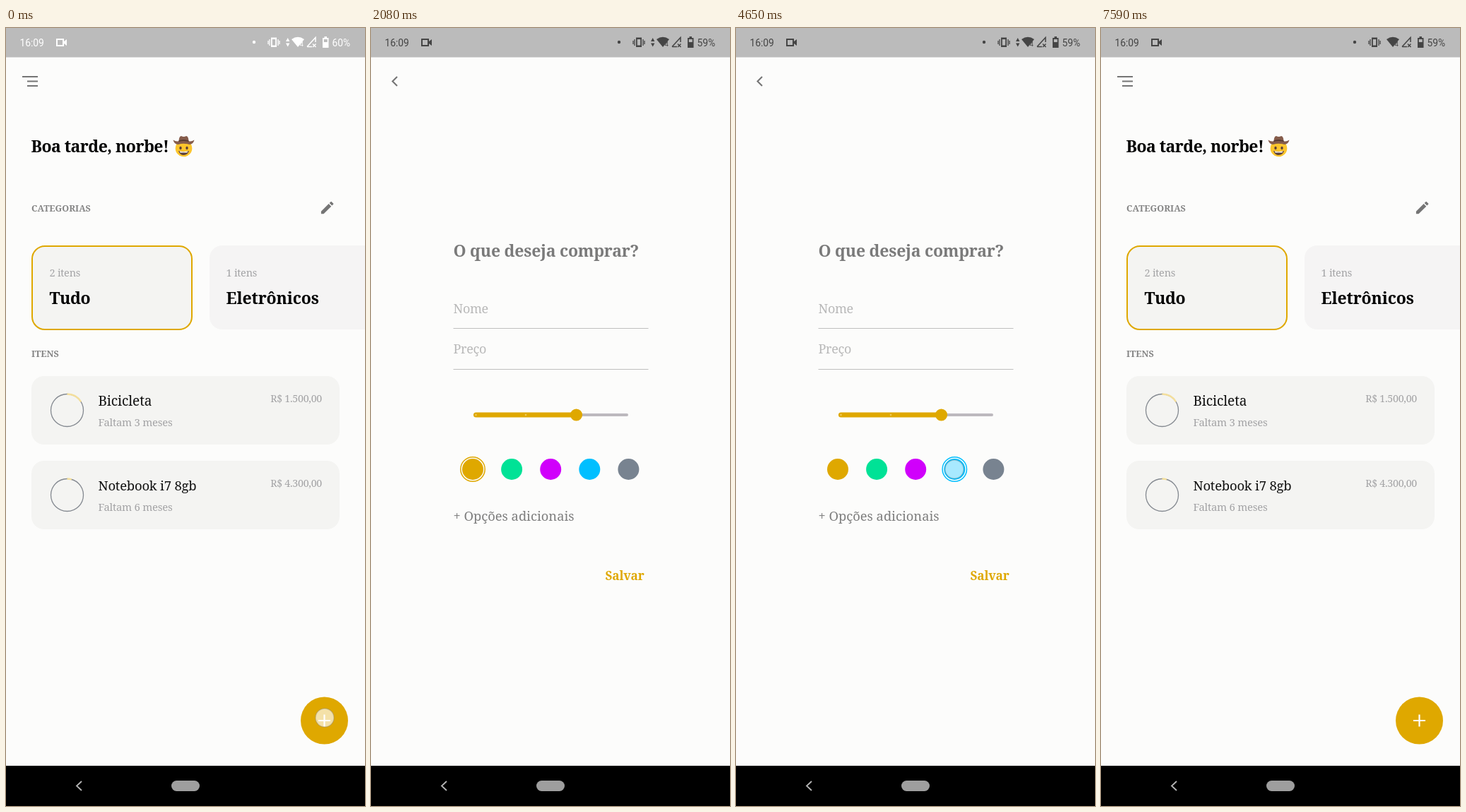
Recreate the animation shown at these times as an HTML page. Size 508 by 1102 pixels, loop 7650 ms.

```html
<!DOCTYPE html>
<html lang="pt-BR">
<head>
<meta charset="utf-8">
<title>Lista de compras</title>
<style>
  html, body { margin: 0; width: 100%; height: 100%; overflow: hidden; background: #000; }
  svg { display: block; width: 100vw; height: 100vh; }
  text { font-family: "Noto Serif", serif; }
  .ui { font-family: Roboto, sans-serif; }
  .big { font-size: 23px; font-weight: 700; }
  .cap { font-size: 12.6px; font-weight: 600; fill: #858585; }
  .light { font-weight: 300; fill: #a3a3a5; letter-spacing: -.25px; }
  .hint { font-size: 18px; fill: #b9b9b9; letter-spacing: -.35px; }
  .line { fill: none; stroke: #757575; stroke-width: 2.1; }
</style>
</head>
<body>
<svg viewBox="0 0 508 1102" preserveAspectRatio="none">
  <defs>
    <clipPath id="screen"><rect width="508" height="1045"/></clipPath>
    <g id="page">
      <rect width="508" height="1045" fill="#fcfcfb"/>
      <rect width="508" height="41.5" fill="#bbb"/>
    </g>
  </defs>
  <rect width="508" height="1102"/>

  <g clip-path="url(#screen)">
    <g id="home">
      <use href="#page"/>
      <path class="line" d="M23 69H45M30 75.5H45M30 82H45"/>
      <text class="big" x="35.500" y="176" letter-spacing="-.52">Boa tarde, norbe!</text>
      <g id="cowboy">
        <circle cx="251.500" cy="170.500" r="11.800" fill="#fcc52c"/>
        <ellipse cx="247" cy="170" rx="1.700" ry="2.300" fill="#5d4037"/>
        <ellipse cx="256" cy="170" rx="1.700" ry="2.300" fill="#5d4037"/>
        <path d="M244 174Q251.500 176 259 174Q257 180 251.500 180T244 174Z" fill="#5d4037"/>
        <path d="M245.500 174.500Q251.500 176 257.500 174.500L256.500 176.500H246.500Z" fill="#fff"/>
        <path d="M236.500 158.500Q241 161.500 244.500 160Q245 153 248 153Q251.500 155 255 153Q258 153 258.500 160Q262 161.500 266.500 158.500Q265 165 259.500 165Q251.500 162.500 243.500 165Q238 165 236.500 158.500Z" fill="#855c4b"/>
        <path d="M244.500 159.500Q251.500 157 258.500 159.500V161Q251.500 159 244.500 161Z" fill="#543930"/>
      </g>
      <text class="cap" x="36" y="260">CATEGORIAS</text>
      <path transform="translate(443 243) scale(.97)" fill="#757575" d="M3 17.25V21h3.75L17.81 9.94l-3.75-3.75L3 17.25zM20.71 7.04a1 1 0 0 0 0-1.41l-2.34-2.34a1 1 0 0 0-1.41 0l-1.83 1.83 3.75 3.75 1.83-1.83z"/>
      <rect x="37" y="309" width="226" height="118" rx="18" fill="#f4f4f2" stroke="#dfa800" stroke-width="2"/>
      <rect x="288" y="308" width="260" height="119" rx="18" fill="#f5f4f4"/>
      <text class="light" x="61.500" y="352" font-size="14.500">2 itens</text>
      <text class="light" x="311.500" y="352" font-size="14.500">1 itens</text>
      <text class="big" x="61.500" y="391" letter-spacing="-.45">Tudo</text>
      <text class="big" x="311.500" y="391" letter-spacing="-.1">Eletrônicos</text>
      <text class="cap" x="36" y="466">ITENS</text>
      <g id="items"></g>
      <circle cx="450.500" cy="981" r="33.500" fill="#dfa800"/>
      <path d="M442 981H459M450.500 972.500V989.500" stroke="#fff" stroke-width="2.200"/>
    </g>

    <rect id="scrim" width="508" height="1045"/>

    <g id="form">
      <use href="#page"/>
      <path class="line" d="M37 69L30.500 75.500L37 82"/>
      <text class="big" x="116.500" y="324" fill="#7a7a7a" letter-spacing="-.23">O que deseja comprar?</text>
      <text class="hint" x="116.500" y="404">Nome</text>
      <text class="hint" x="116.500" y="461">Preço</text>
      <path d="M116.500 425.500H392.500M116.500 483.500H392.500" stroke="#bfbfbf" stroke-width="1.200"/>
      <path d="M147 548H362" stroke="#bdb9be" stroke-width="4" stroke-linecap="round"/>
      <path d="M148.500 548H290" stroke="#dfa800" stroke-width="7" stroke-linecap="round"/>
      <circle cx="148.500" cy="548" r="1.300" fill="#ecc95c"/>
      <circle cx="219" cy="548" r="1.300" fill="#ecc95c"/>
      <circle cx="290.500" cy="548" r="8.600" fill="#dfa800"/>
      <g id="dots"></g>
      <circle id="ring" cy="625" r="17.200" fill="none" stroke-width="1.500"/>
      <text x="116.500" y="698" font-size="18.300" fill="#7e7e7e">+ Opções adicionais</text>
      <text x="331.500" y="782" font-size="17.200" font-weight="700" fill="#dfa800" letter-spacing="-.2">Salvar</text>
    </g>

    <g id="tip">
      <path/>
      <text class="ui" y="694.500" font-size="20.600" fill="#fff" text-anchor="middle"></text>
    </g>
  </g>

  <g id="status" font-size="13.800">
    <text class="ui" x="19.500" y="26">16:09</text>
    <path d="M71 15H82V19L86 16V25L82 22V26H71ZM73 17V24H80V17Z" fill-rule="evenodd"/>
    <g id="alert">
      <circle cx="351" cy="20" r="2.200"/>
      <path d="M375 13.500H383V27H375ZM376.800 16V24.500H381.200V16Z" fill-rule="evenodd"/>
      <path d="M373 16V25M385 16V25M371 18V23M387 18V23" class="edge" stroke-width="1.300"/>
    </g>
    <path id="arrows" d="M396 19L398.700 14L401.400 19ZM396 21.500H401.400L398.700 26.500Z"/>
    <path d="M404 16Q413 9.500 422 16L413 27Z"/>
    <text class="ui" x="415.500" y="26" font-size="9.500">4</text>
    <path class="edge" d="M426 26.500L438 13.500V20M426 26.500H433M434 22.500L438.500 27M438.500 22.500L434 27" stroke-width="1.500" fill="none"/>
    <path d="M448 14H450.500V12H454V14H456.500V28H448ZM449.800 16V20H454.700V16Z" fill-rule="evenodd"/>
    <text class="ui" id="charge" x="461.500" y="26"></text>
  </g>

  <path d="M107 1067L100 1073.500L107 1080" fill="none" stroke="#b5b5b5" stroke-width="1.800"/>
  <rect x="234" y="1066" width="40" height="15" rx="7.500" fill="#9e9e9e"/>
  <circle id="touch" r="13" fill="#fff" fill-opacity=".66" stroke="#888" stroke-opacity=".35" stroke-width="1.500"/>
</svg>
<script>
const LOOP = 7650, PUSH = 270, POP = 7130, ZOOM = 300, TIP_IN = 250, TIP_OUT = 300;
const colors = ['#dfa800', '#00e296', '#d000fb', '#00bfff', '#788390'];
const dotX = i => 144 + 55.1 * i;
const tips = [
  { dot: 0, label: 'Tudo', mid: 181.5, show: 440, hide: 1545 },
  { dot: 2, label: 'Domésticos', mid: 254, show: 2770, hide: 3875 },
  { dot: 3, label: 'Roupas', mid: 309, show: 4730, hide: 5825 }
];
const touches = [
  { x: 451, y: 977, at: -60 },
  { x: 254, y: 625, at: 2570 },
  { x: 309, y: 625, at: 4530 },
  { x: 33, y: 75, at: 6910 }
];

const $ = id => document.getElementById(id);
const set = (el, attrs) => { for (const k in attrs) el.setAttribute(k, attrs[k]); };
const mix = (a, b, p) => a + (b - a) * p;
const span = (t, a, b) => Math.min(1, Math.max(0, (t - a) / (b - a)));
const bez = (a, b, c, d, u) => {
  const v = 1 - u;
  return v * v * v * a + 3 * v * v * u * b + 3 * v * u * u * c + u * u * u * d;
};

// Two-piece easing: quick start, very slow finish
function extraSlow(t) {
  const [xs, ys] = t < 1 / 6
    ? [[0, .05, .1333, 1 / 6], [0, 0, .06, .4]]
    : [[1 / 6, .2083, .25, 1], [.4, .82, 1, 1]];
  let lo = 0, hi = 1;
  for (let i = 0; i < 24; i++) {
    const u = (lo + hi) / 2;
    if (bez(...xs, u) < t) lo = u; else hi = u;
  }
  return bez(...ys, lo);
}
const outBack = p => 1 + 2.70158 * (p - 1) ** 3 + 1.70158 * (p - 1) ** 2;

function zoom(el, s) {
  el.setAttribute('transform', `translate(254 522.5) scale(${s}) translate(-254 -522.5)`);
}

function item(y, name, months, price, angle, size, gap) {
  const cy = y + 48.5, a = angle * Math.PI / 180;
  const ax = 86.5 + 23 * Math.sin(a), ay = cy - 23 * Math.cos(a);
  return `<rect x="36" y="${y}" width="436" height="97" rx="18" fill="#f4f4f2"/>
    <circle cx="86.500" cy="${cy}" r="23" fill="none" stroke="#858a91" stroke-width="1.300"/>
    <path d="M86.500 ${cy - 23}A23 23 0 0 1 ${ax} ${ay}" fill="none" stroke="#f4df9c" stroke-width="2.400"/>
    <text x="130.500" y="${y + 42}" font-size="${size}" letter-spacing="${gap}" fill="#111">${name}</text>
    <text class="light" x="130.500" y="${y + 71}" font-size="14.900">Faltam ${months} meses</text>
    <text class="light" x="447" y="${y + 37}" font-size="14.200" text-anchor="end">R$ ${price}</text>`;
}
$('items').innerHTML = item(493, 'Bicicleta', 3, '1.500,00', 58, 19, -.1)
  + item(613, 'Notebook i7 8gb', 6, '4.300,00', 16, 18.5, -.22);
$('dots').innerHTML = colors.map((c, i) =>
  `<circle cx="${dotX(i)}" cy="625" r="15" fill="${c}"/>`).join('');

function drawPages(t) {
  const home = $('home'), form = $('form'), scrim = $('scrim');
  if (t < POP) {
    const p = span(t, PUSH, PUSH + ZOOM), e = extraSlow(p);
    zoom(home, mix(1, 1.05, e));
    zoom(form, mix(.85, 1, e));
    set(form, { opacity: span(p, .125, .25) });
    set(scrim, { opacity: .6 * span(p, .2075, .4175) });
  } else {
    const p = span(t, POP, POP + ZOOM), e = extraSlow(p);
    zoom(home, mix(1.1, 1, e));
    zoom(form, mix(1, .9, e));
    set(form, { opacity: 1 - span(p, .0825, .2075) });
    set(scrim, { opacity: 0 });
  }
}

function drawTip(t) {
  const tip = tips.find(o => t >= o.show && t < o.hide + TIP_OUT);
  $('tip').style.display = tip ? '' : 'none';
  if (!tip) return;
  const p = Math.min(span(t, tip.show, tip.show + TIP_IN), 1 - span(t, tip.hide, tip.hide + TIP_OUT));
  const x = dotX(tip.dot), left = tip.mid - 90, r = 21.5;
  const tilt = Math.cos(Math.PI / 2 * (1 - outBack(p)));
  const [shape, label] = $('tip').children;
  set(shape, {
    fill: colors[tip.dot],
    d: `M${x} 642C${x + 2} 656 ${x + 8} 666 ${x + 18} 667H${x - 18}C${x - 8} 666 ${x - 2} 656 ${x} 642Z
      M${left + r} 666h${180 - 2 * r}a${r} ${r} 0 0 1 0 43h${2 * r - 180}a${r} ${r} 0 0 1 0 -43Z`
  });
  label.setAttribute('x', tip.mid);
  label.textContent = tip.label;
  set($('tip'), { opacity: p, transform: `translate(0 642) scale(1 ${tilt}) translate(0 -642)` });
}

function drawStatus(t) {
  const c = Math.round(mix(255, 69, span(t, PUSH, PUSH + 250)));
  const tone = `rgb(${c},${c},${c})`, late = t >= POP;
  set($('status'), { fill: tone });
  document.querySelectorAll('.edge').forEach(el => el.setAttribute('stroke', tone));
  set($('alert'), { transform: `translate(${late ? 8 : 0} 0)` });
  set($('arrows'), { opacity: late ? 0 : 1 });
  $('charge').textContent = t < 2000 ? '60%' : '59%';
}

function drawTouch(t) {
  const hit = touches.find(o => t >= o.at && t < o.at + 130);
  set($('touch'), hit ? { cx: hit.x, cy: hit.y, opacity: 1 } : { opacity: 0 });
}

function draw(now) {
  const t = now % LOOP;
  const pick = t < 2680 ? 0 : t < 4640 ? 2 : 3;
  drawPages(t);
  set($('ring'), { cx: dotX(pick), stroke: colors[pick] });
  drawTip(t);
  drawStatus(t);
  drawTouch(t);
}

function tick() {
  draw(performance.now());
  requestAnimationFrame(tick);
}
draw(0);
requestAnimationFrame(tick);
</script>
</body>
</html>
```
